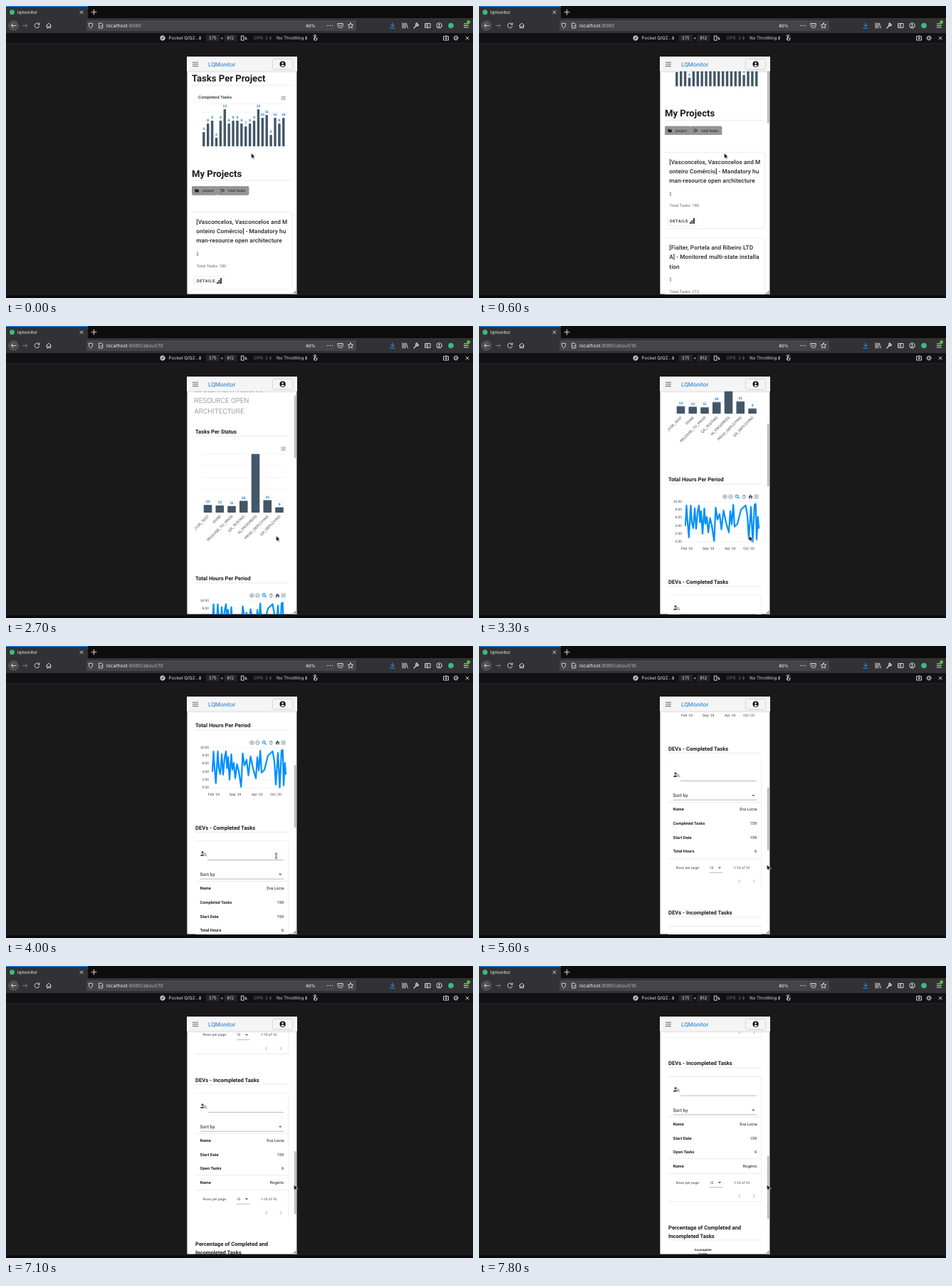
Recreate the animation shown at these times as an HTML page. Size 656 px wide and 410 px high, loop 8000 ms.

```html
<!DOCTYPE html>
<html lang="en">
<head>
<meta charset="utf-8">
<title>Project dashboard</title>
<style>
@property --scroll { syntax: "<number>"; inherits: true; initial-value: 0; }
html, body { margin: 0; width: 100%; height: 100%; overflow: hidden; background: #19191a; }
svg { display: block; width: 100%; height: 100%; }
text { white-space: pre; text-rendering: geometricPrecision; }
#browser { font: 6.3px Inter, sans-serif; fill: #f2f2f3; }
#phone { font: 5.75px Roboto, sans-serif; fill: #222; }
.icon { fill: none; stroke: #d3d3d6; stroke-width: 1; stroke-linecap: round; stroke-linejoin: round; }
.dim { fill: #b1b1b6; }
.off { fill: #747477; }
.h1 { font-size: 13.1px; font-weight: 700; fill: #1c1c1c; }
.h3 { font-size: 7.65px; font-weight: 700; fill: #1c1c1c; }
.title { font-size: 8.2px; font-weight: 500; letter-spacing: .0125em; }
.light { font-size: 9.85px; font-weight: 300; fill: #777; }
.grey { fill: #707070; }
.bold { font-weight: 700; font-size: 5.75px; }
.value { text-anchor: end; font-size: 5.75px; }
.small { font-size: 4.93px; fill: #444; }
.axis { font: 4.93px "Liberation Sans", Arial, sans-serif; fill: #373d3f; }
.label { font: 700 4.93px "Liberation Sans", Arial, sans-serif; fill: #1976d2; text-anchor: middle; }
.mid { text-anchor: middle; }
.end { text-anchor: end; }
.rule { stroke: #dedede; stroke-width: .6; }
.grid { stroke: #e6e6e6; stroke-width: .5; }
.field { stroke: #8a8a8a; stroke-width: .6; }
.bars { fill: #435768; }
.tool { fill: none; stroke: #6e8192; stroke-width: .8; }
.card { fill: #fff; filter: drop-shadow(0 .8px .5px #0005); }
.bar-shadow { fill: #f5f5f5; filter: drop-shadow(0 .9px .9px #0005); }
.thumb { fill: #b9b9b9; }

#phone, #cursor, .page, .grow, .switch { animation: 8s infinite; }
#phone { animation-name: scroll; animation-timing-function: cubic-bezier(.333, 1, .667, 1); }
.content { transform: translateY(calc(var(--scroll) * -1px)); }
#home .thumb { transform: translateY(calc(var(--scroll) * .222px)); animation: thumb 8s step-end infinite; }
#about .thumb { transform: translateY(calc(var(--scroll) * .2865px)); }
#home { animation-name: home; }
#about { animation-name: about; }
.grow { animation-name: grow; }
#cursor { animation-name: cursor; animation-timing-function: ease-in-out; }
.switch { animation-timing-function: step-end; }
#path { animation-name: path; }
#arrow { animation-name: arrow; }
#hand { animation-name: hand; }
#beam { animation-name: beam; }
#ripple { animation: ripple 8s infinite; }

@keyframes scroll {
  0%, .625% { --scroll: 0; }
  10.625%, 34.375% { --scroll: 87; }
  44.375%, 45.625% { --scroll: 230; }
  56.25%, 64.375% { --scroll: 354.9; }
  75%, 75.625% { --scroll: 450.5; }
  88.75%, 90.625% { --scroll: 655.2; }
  95.625%, 100% { --scroll: 678.5; }
}
@keyframes thumb { 0% { opacity: 0; } 1%, 100% { opacity: 1; } }
@keyframes home { 0%, 21.9% { opacity: 1; } 25%, 100% { opacity: 0; } }
@keyframes about { 0%, 25% { opacity: 0; } 28.5%, 100% { opacity: 1; } }
@keyframes grow { 0%, 26% { transform: scaleY(0); animation-timing-function: ease-out; } 33%, 100% { transform: none; } }
@keyframes cursor {
  0%, 11.9% { transform: translate(344.5px, 206.5px); }
  16.25%, 24.4% { transform: translate(282px, 294.5px); }
  31.25%, 50.6% { transform: translate(379.5px, 294.5px); }
  55.6%, 56.9% { transform: translate(413px, 302px); }
  61.9%, 100% { transform: translate(404.5px, 307px); }
}
@keyframes path { 0% { opacity: 0; } 21.25%, 100% { opacity: 1; } }
@keyframes arrow { 0% { opacity: 1; } 15.6% { opacity: 0; } 24.4% { opacity: 1; } 49% { opacity: 0; } 50.75%, 100% { opacity: 1; } }
@keyframes hand { 0% { opacity: 0; } 15.6% { opacity: 1; } 24.4%, 100% { opacity: 0; } }
@keyframes beam { 0% { opacity: 0; } 49% { opacity: 1; } 50.75%, 100% { opacity: 0; } }
@keyframes ripple { 0%, 18.75% { opacity: 0; } 20% { opacity: .16; } 22.5%, 100% { opacity: 0; } }
</style>
</head>
<body>
<svg viewBox="0 0 656 410">
  <defs>
    <clipPath id="screen"><path d="M254.4 71.6h154v333h-154z"/></clipPath>
    <clipPath id="plot"><path d="M265 250h132v180H265z"/></clipPath>
  </defs>

  <g id="browser">
    <path fill="#19191a" d="M0 0h656v410H0z"/>
    <path fill="#0c0c0d" d="M0 0h656v17H0z"/>
    <path fill="#323234" d="M0 0h115v17H0zM0 17h656v21H0z"/>
    <path fill="#0a84ff" d="M0 0h115v1H0z"/>
    <path fill="#111113" d="M0 38h656v14H0z"/>
    <path fill="#2c2c2e" d="M0 52h656v.6H0z"/>
    <path fill="#0c080f" d="M0 406.5h656v3.5H0z"/>
    <rect x="113" y="20" width="379" height="15" rx="1.5" fill="#454547"/>
    <circle cx="8.5" cy="8.7" r="3.5" fill="#41b883"/>
    <circle cx="625" cy="27.5" r="3.8" fill="#41b883"/>
    <circle cx="10.5" cy="27.5" r="6.8" fill="#4c4c4f" stroke="#77777a" stroke-width=".5"/>
    <text x="16" y="11">lqmonitor</text>
    <text x="141" y="30" font-size="6.95">localhost<tspan class="dim">:8080</tspan><tspan id="path" class="dim switch">/about/10</tspan></text>
    <text x="428" y="29.7" font-size="5.9" font-weight="500" class="mid">80%</text>

    <g class="icon">
      <path d="M104 6.7l4 4m0-4l-4 4M120 8.7h7m-3.5-3.5v7"/>
      <path d="M14 27.5H7.5m2.7-2.7l-2.7 2.7 2.7 2.7"/>
      <path stroke="#77777a" d="M23.5 27.5H30m-2.7-2.7l2.7 2.7-2.7 2.7"/>
      <path d="M46.5 25.5a3.4 3.4 0 1 0 .4 3M47 23.8v2.3h-2.3"/>
      <path d="M56.5 27.5l3.5-3.3 3.5 3.3m-6-.6v4h1.7v-2h1.6v2h1.7v-4"/>
      <path d="M116.3 24.8l2.7-.9 2.7.9c0 3-.6 5-2.7 6.3-2.1-1.3-2.7-3.3-2.7-6.3z"/>
      <path d="M131 24h3.2l1.6 1.7V31H131zM132.5 28h1.8"/>
      <path stroke-width="1.6" d="M452 27.5h0m3.3 0h0m3.3 0h0"/>
      <path d="M466.2 24.5h7v2.7a3.5 3.5 0 0 1-7 0zm1.8 2l1.7 1.6 1.7-1.6"/>
      <path d="M484 23.7l1.1 2.5 2.7.3-2 1.8.6 2.7-2.4-1.4-2.4 1.4.6-2.7-2-1.8 2.7-.3z"/>
      <path stroke="#0a84ff" stroke-width="1.2" d="M543 23.5v5m-2.2-2l2.2 2.1 2.2-2.1m-5.4 4.7h6.4"/>
      <path d="M557 24v7m2-7v7m2-7v7m1.3-6.7l2 6.5"/>
      <path stroke-width="1.3" d="M573 31l3.7-3.7M577.5 23.8a2 2 0 1 0 2 2.5l-1.8-.3z"/>
      <path d="M589 24.5h7v6h-7zm3.3 0v6m-2.3-4h1m-1 2h1"/>
      <circle cx="608.5" cy="27.5" r="3.7"/><path fill="#d3d3d6" d="M608.5 25.6a.7.7 0 1 1-.1 0M606.7 29.6q1.8-2 3.6 0"/>
      <path d="M643.3 25h6m-6 2.5h6m-6 2.5h6"/>
      <circle cx="220" cy="45" r="3.2" fill="#a5a5a8"/><path stroke="#2a2a2c" d="M218.7 46.3l2.6-2.6"/>
      <path d="M330.7 42h3.4v6.2h-3.4zM335.6 44.2h1.6V47m-1-.9l1 1 1-1"/>
      <path d="M432.2 46l1 2h3l1-2.8-2.7-.6v-2.2h-1.2v4zM431.8 42a2.4 2.4 0 0 1 4.4 0"/>
      <path d="M615 42.7h6.5V48H615zM617 42.7l.6-.8h1.4l.6.8"/><circle cx="618.2" cy="45.3" r="1"/>
      <circle cx="632" cy="45" r="2"/><circle cx="632" cy="45" r="3.1" stroke-dasharray="1 1.43"/>
      <path d="M646 43l4.2 4.2m0-4.2L646 47.2"/>
    </g>
    <circle cx="649.6" cy="22.6" r="2.5" fill="#30d01c"/>

    <g font-size="6.2" fill="#dededf">
      <text x="228.5" y="47.3">Pocket Q/QZ...</text>
      <rect x="281" y="40.3" width="19" height="9.7" fill="#242426"/>
      <rect x="306.5" y="40.3" width="18" height="9.7" fill="#242426"/>
      <text x="290.3" y="47.3" class="mid">375</text>
      <text x="303.3" y="47.3" class="mid">×</text>
      <text x="315.3" y="47.3" class="mid">812</text>
      <text x="348" y="47.3" class="off">DPR: 3</text>
      <text x="380" y="47.3">No Throttling</text>
      <path d="M271 44.4l1.6-2 1.6 2zm0 1.2l1.6 2 1.6-2zM420 44.4l1.6-2 1.6 2zm0 1.2l1.6 2 1.6-2z"/>
      <path class="off" d="M370 44.4l1.6-2 1.6 2zm0 1.2l1.6 2 1.6-2z"/>
    </g>
  </g>

  <g id="phone" clip-path="url(#screen)">
    <path fill="#fff" d="M254 71h155v334H254z"/>
    <g id="home" class="page">
      <g class="content"></g>
      <rect class="thumb" x="405" y="72.3" width="2.6" height="73.5" rx="1.3"/>
    </g>
    <g id="about" class="page">
      <g class="content"></g>
      <rect class="thumb" x="405" y="72.3" width="2.6" height="88.5" rx="1.3"/>
    </g>
    <path class="bar-shadow" d="M254 71h155v20.7H254z"/>
    <path stroke="#555" stroke-width=".9" d="M262 79.3h8m-8 2.6h8m-8 2.6h8"/>
    <text x="284" y="85" font-size="8.2" fill="#1976d2">LQMonitor</text>
    <rect x="375" y="75" width="27" height="13.7" rx="1.6" class="bar-shadow"/>
    <circle cx="388.6" cy="81.7" r="4.1" fill="#151515"/>
    <circle cx="388.6" cy="80.3" r="1.2" fill="#f5f5f5"/>
    <path fill="#f5f5f5" d="M386.1 83.8q2.5-2.4 5 0-2.5 2.4-5 0z"/>
    <path fill="#c4c4c4" d="M408.4 398v7h-7z"/>
    <path stroke="#777" stroke-width=".6" d="M402.5 405l5.5-5.5m-3 5.5l3-3"/>
  </g>

  <g id="cursor">
    <path id="arrow" class="switch" fill="#000" stroke="#fff" stroke-width=".6" d="M0 0v7.6l1.8-1.6 1.2 2.7 1.3-.6-1.2-2.6h2.4z"/>
    <path id="hand" class="switch" fill="#fff" stroke="#111" stroke-width=".7" stroke-linejoin="round" d="M-.7 4.6V.6q.7-1 1.4 0V3l3.6.7q1 .4.8 1.6L4.4 8H.3L-2.5 4.8q.5-1.1 1.8-.2zM2 3.3v1.5m1.4-1.2v1.4"/>
    <path id="beam" class="switch" fill="none" stroke="#111" stroke-width=".9" d="M-1.6-3.6Q0-3.6 0-2.6v5.4Q0 3.8-1.6 3.8M1.6-3.6Q0-3.6 0-2.6m0 5.4q0 1 1.6 1"/>
  </g>
</svg>

<script>
const text = (x, y, str, cls = "", attrs = "") => `<text x="${x}" y="${y}" class="${cls}" ${attrs}>${str}</text>`;
const line = (x1, x2, y, cls = "rule") => `<path class="${cls}" d="M${x1} ${y}H${x2}"/>`;
const shape = (d, attrs = "") => `<path d="${d}" ${attrs}/>`;
const menu = (x, y) => shape(`M${x} ${y}h6.4m-6.4 2h6.4m-6.4 2h6.4`, 'class="tool"');
const caret = (x, y) => shape(`M${x - 2.2} ${y - 1}h4.4l-2.2 2.2z`, 'fill="#555"');
const repeat = (n, make) => Array.from({ length: n }, (_, i) => make(i)).join("");

function barChart({ values, x, step, width, base, unit, radius }) {
  const top = v => base - v * unit;
  const bars = values.map((v, i) =>
    `<rect x="${x + i * step - width / 2}" y="${top(v)}" width="${width}" height="${v * unit}" rx="${radius}"/>`);
  const labels = values.map((v, i) => text(x + i * step, Math.max(top(v) - 2.8, base - 79.5), v, "label"));
  return [bars.join(""), labels.join("")];
}

function projectCard(y, lines, total) {
  return `<rect class="card" x="261" y="${y}" width="140.5" height="107.7" rx="1.6"/>` +
    lines.map((l, i) => text(267.3, y + 16.5 + i * 13.15, l, "title")).join("") +
    text(267.6, y + 60.6, "[]", "grey") +
    text(267.5, y + 77.2, `Total Tasks: ${total}`, "grey") +
    `<rect class="card" x="264.5" y="${y + 89.8}" width="42.5" height="13.6" rx="1.5"/>` +
    text(268, y + 98.8, "DETAILS", "", 'font-weight="500" letter-spacing=".5"') +
    shape(`M296 ${y + 100.5}v-2.3h1.7v2.3zm2.5 0v-5h1.7v5zm2.5 0v-8h1.8v8z`);
}

function devTable(y, rows) {
  const foot = y + 57.5 + 19.6 * rows.length;
  return `<rect class="card" x="266" y="${y}" width="130.7" height="${foot - y + 39.3}" rx="1.6"/>` +
    `<circle cx="276" cy="${y + 16}" r="1.6" fill="#444"/>` +
    shape(`M273 ${y + 21}q0-2.6 4-2.4l1 2.4z`, 'fill="#444"') +
    `<circle cx="279.4" cy="${y + 18.7}" r="1.5" fill="none" stroke="#444" stroke-width=".7"/>` +
    shape(`M280.5 ${y + 19.8}l1.7 1.7`, 'stroke="#444" stroke-width=".8"') +
    line(283, 390, y + 26.6, "field") +
    text(272.6, y + 49.2, "Sort by", "", 'font-size="6.57" font-weight="500" fill="#444"') +
    caret(385.2, y + 47) + line(272.6, 390, y + 53.3, "field") + line(266, 396.7, y + 56.5) +
    rows.map(([name, value], i) => {
      const rowY = y + 68.5 + 19.6 * i;
      return (i && name === "Name" ? line(266, 396.7, rowY - 12.1) : "") +
        text(272.6, rowY, name, "bold") + text(390.3, rowY, value, "value");
    }).join("") +
    line(266, 396.7, foot) +
    text(276.5, foot + 14.2, "Rows per page:", "small") + text(323.8, foot + 14.2, "10", "small") +
    caret(338, foot + 12.6) + line(323.6, 342.4, foot + 19.4, "field") +
    text(358, foot + 14.2, "1-10 of 10", "small") +
    shape(`M366.8 ${foot + 29.4}l-2.1 2.3 2.1 2.3M385 ${foot + 29.4}l2.1 2.3-2.1 2.3`, 'fill="none" stroke="#999" stroke-width=".8"');
}

function homePage() {
  const [bars, labels] = barChart({
    values: [5, 8, 9, 3, 9, 13, 8, 9, 9, 8, 7, 8, 9, 13, 10, 11, 4, 10, 8, 10],
    x: 277.8, step: 5.895, width: 3.4, base: 197, unit: 4, radius: .7
  });
  return text(261, 105.6, "Tasks Per Project", "h1") + line(261, 401, 111.2) +
    text(270, 129.8, "Completed Tasks", "axis", 'style="font-size:5.75px;font-weight:700"') + menu(386.4, 127.3) +
    repeat(6, i => line(275, 393, 137 + 12 * i, "grid")) + `<g class="bars">${bars}</g>` + labels +
    text(261, 239.6, "My Projects", "h1") + line(261, 401, 245) +
    `<g fill="#949494" style="filter:drop-shadow(0 .5px .6px #0007)"><rect x="261" y="253" width="36" height="12.4" rx="1.6"/><rect x="297" y="253" width="44.2" height="12.4" rx="1.6"/></g>` +
    shape("M265.4 257h2l.7.8h2.7v3.8h-5.4z") +
    text(276, 261, "project", "", 'font-size="5.2"') +
    shape("M301.5 257.5h3.5m-3.5 1.8h5.5m-5.5 1.8h2.5m1-3.8l1.8 1.8-1.8 1.8", 'fill="none" stroke="#222" stroke-width=".7"') +
    text(312, 261, "total tasks", "", 'font-size="5.2"') +
    projectCard(289.5, ["[Vasconcelos, Vasconcelos and M", "onteiro Comércio] - Mandatory hu", "man-resource open architecture"], 180) +
    `<rect id="ripple" x="264.5" y="379.3" width="42.5" height="13.6" rx="1.5"/>` +
    projectCard(410.2, ["[Fialter, Portela and Ribeiro LTD", "A] - Monitored multi-state installa", "tion"], 212);
}

function statusChart() {
  const names = ["READY_FOR_TEST", "DONE", "RELEASE_TO_PROD", "QA_TESTING", "IN_PROGRESS", "PROD_DEPLOYING", "QA_DEPLOYING"];
  const x = 283.5, step = 16.75, base = 349;
  const [bars, labels] = barChart({ values: [13, 12, 11, 20, 99, 21, 9], x, step, width: 11.6, base, unit: .83, radius: 1 });
  return text(266, 237.7, "Tasks Per Status", "h3") + line(266, 397, 241.5) + menu(386.4, 257.3) +
    repeat(6, i => line(275, 392, 266.7 + 16.45 * i, "grid")) +
    `<g class="bars grow" style="transform-origin:0 ${base}px">${bars}</g>` + labels +
    `<g clip-path="url(#plot)">` + names.map((n, i) => {
      const at = `${x + step * i + 2} ${base + 5.5}`;
      return `<text class="axis end" transform="translate(${at}) rotate(-45)">${n}</text>`;
    }).join("") + "</g>";
}

function hoursChart() {
  const top = 472, base = 528.5;
  const points = [
    [290, 176], [291.5, 148], [292.5, 165], [294.8, 193], [297.5, 148], [299, 172], [301, 180], [303, 152],
    [305, 181], [307, 158], [309, 148], [310.5, 172], [312, 156], [314, 188], [316.5, 152], [318, 174], [320, 164],
    [322, 186], [324.5, 166], [327, 176], [330.3, 198], [332.5, 151], [335, 168], [338, 160], [340.5, 182],
    [343.5, 155], [347, 172], [351, 186], [353, 156], [355, 175], [357.2, 147], [359, 178], [363, 174],
    [368, 154], [374.5, 148], [377, 162], [379, 195], [382, 150], [384.5, 199], [387, 147], [388.7, 146],
    [390, 196], [391.8, 164], [393, 180]
  ];
  const trace = "M" + points.map(([x, y]) => `${x} ${y + 329.5}`).join("L");
  return text(266, 444, "Total Hours Per Period", "h3") + line(266, 397, 447.7) +
    `<g class="tool"><circle cx="345.4" cy="465.4" r="2.7"/><circle cx="353.4" cy="465.4" r="2.7"/>` +
    shape("M344 465.4h2.8m-1.4-1.4v2.8M352 465.4h2.8M370 465.5l1.4 2.4h2l.8-4m-3.2 1.6v-2.7m1.2 2v-2.4m1.1 2.6v-2.2") + "</g>" +
    `<g class="tool" style="stroke:#008ffb;stroke-width:1.1"><circle cx="362.3" cy="464.8" r="1.9"/>${shape("M363.7 466.2l2 2")}</g>` +
    shape("M378 465.6l3.4-3.1 3.4 3.1h-1v2.6h-1.7v-1.8h-1.4v1.8H379v-2.6z", 'fill="#566878"') + menu(386.4, 463.3) +
    repeat(6, i => {
      const y = top + (base - top) / 5 * i;
      return line(288.5, 393, y, "grid") + text(285, y + 1.5, (10 - 2 * i).toFixed(2), "axis end");
    }) +
    ["Feb '19", "Sep '19", "Apr '20", "Oct '20"].map((m, i) => text([291.8, 322, 352.8, 379][i], 539.8, m, "axis mid")).join("") +
    `<g class="grow" style="transform-origin:0 ${base}px">` +
    shape(trace, 'fill="none" stroke="#008ffb" stroke-width="2.2" stroke-linecap="round" stroke-linejoin="round"') + "</g>";
}

function aboutPage() {
  const title = ["[VASCONCELOS,", "VASCONCELOS AND", "MONTEIRO COMÉRCIO] -", "MANDATORY HUMAN-", "RESOURCE OPEN", "ARCHITECTURE"];
  return title.map((l, i) => text(264.5, 135.5 + 14.8 * i, l, "light")).join("") +
    statusChart() + hoursChart() +
    text(266, 587.3, "DEVs - Completed Tasks", "h3") + line(266, 397, 591) +
    devTable(603.5, [["Name", "Eva Lúcia"], ["Completed Tasks", 159], ["Start Date", 159], ["Total Hours", 6]]) +
    text(266, 817.8, "DEVs - Incompleted Tasks", "h3") + line(266, 397, 821.3) +
    devTable(834, [["Name", "Eva Lúcia"], ["Start Date", 159], ["Open Tasks", 6], ["Name", "Rogério"]]) +
    text(266, 1048.5, "Percentage of Completed and", "h3") + text(266, 1060, "Incompleted Tasks", "h3") + line(266, 397, 1063.3) +
    text(315, 1078.6, "Incomplete", "label", 'style="fill:#222;font-size:4.5px"') +
    text(314.5, 1084.2, "12.8%", "label", 'style="fill:#222;font-size:4.5px"');
}

document.querySelector("#home .content").innerHTML = homePage();
document.querySelector("#about .content").innerHTML = aboutPage();
</script>
</body>
</html>
```
